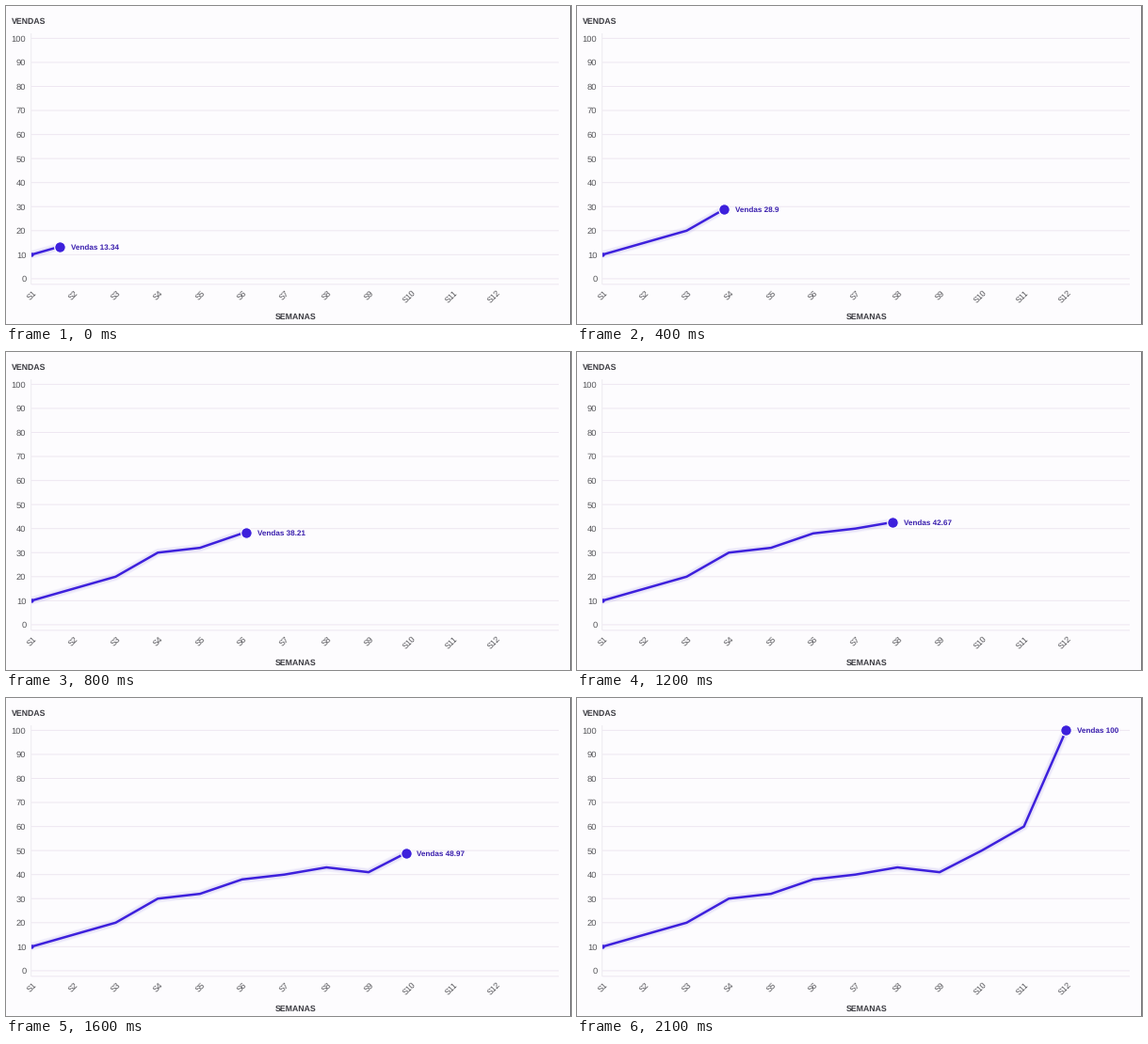
These frames come from a looping animation (600x338 px, 2.2 s). A matplotlib script:

```python
import numpy as np
import matplotlib.pyplot as plt
from matplotlib.animation import FuncAnimation
from matplotlib.patches import Rectangle

W, H, DPI = 600, 338, 100
FRAMES, INTERVAL = 22, 100
PX = 72 / DPI

BG, GRID, AXIS = "#fdfcfe", "#eee7f1", "#eeebf1"
TICK, TITLE = "#545458", "#3c3c42"
LINE, LABEL = "#3d20dc", "#3a1fae"

X0, X1, WEEK = 27, 587, 44.77
SALES = np.array([10, 15, 20, 30, 32, 38, 40, 43, 41, 50, 60, 100])
WEEKS = np.arange(len(SALES))

# Weeks reached at key steps; the pace is nearly constant, then the line rests.
KEY_STEPS = [0, 4, 6, 8, 12, 16, 18, 19, 20]
KEY_WEEKS = [0.668, 2.89, 3.778, 5.105, 6.89, 8.8856, 10.2233, 10.667, 11]


def sx(week):
    return X0 - 0.1 + WEEK * week


def sy(value):
    return 289.9 - 2.555 * value


plt.rcParams["font.family"] = "Liberation Sans"
plt.rcParams["text.hinting"] = "none"

fig = plt.figure(figsize=(W / DPI, H / DPI), dpi=DPI, facecolor=BG)
ax = fig.add_axes([0, 0, 1, 1])
ax.set_xlim(0, W)
ax.set_ylim(H, 0)
ax.axis("off")


def text(x, y, s, size, color, **kw):
    """Text centred vertically on its capital height."""
    return ax.text(x, y + 0.345 * size, s, fontsize=size * PX, color=color,
                   va="baseline", **kw)


def rule(xs, ys, color):
    ax.plot(xs, ys, color=color, lw=PX, solid_capstyle="butt", snap=False,
            zorder=1)


for v in range(0, 101, 10):
    rule([X0, X1], [sy(v)] * 2, GRID)
    text(21.4, sy(v) + 0.1, str(v), 9.4, TICK, ha="right")
rule([X0, X1], [295.8] * 2, GRID)
rule([X0 - 0.3] * 2, [29, 296], AXIS)

for w in WEEKS:
    ax.text(sx(w) + 3.3, 303.1, f"S{w + 1}", fontsize=8.7 * PX, color=TICK,
            rotation=45, rotation_mode="anchor", ha="right",
            va="center_baseline")

text(5.8, 15.4, "VENDAS", 8.75, TITLE, weight="bold")
text(307.2, 330.3, "SEMANAS", 8.8, TITLE, weight="bold", ha="center")
ax.add_patch(Rectangle((599, 0), 1, H, color="#77777b", lw=0))

clip = Rectangle((X0 - 0.5, 0), W - X0, H, transform=ax.transData)


def stroke(width, color, alpha=1, z=3):
    ln, = ax.plot([], [], color=color, lw=width * PX, alpha=alpha, zorder=z,
                  solid_capstyle="round", solid_joinstyle="round", snap=False)
    ln.set_clip_path(clip)
    return ln


def disc(size, edge, z):
    d, = ax.plot([], [], "o", ms=size * PX, mfc=LINE, mec="white",
                 mew=edge * PX, snap=False, zorder=z)
    return d


strokes = [stroke(w, LINE, 0.035, 2) for w in (9, 7.4, 5.8)]
strokes.append(stroke(2.5, LINE))
start = disc(4.4, 0, 4)
start.set_data([sx(0)], [sy(10)])
start.set_clip_path(clip)
dot = disc(11.6, 1.2, 5)
label = text(0, 0, "", 8.1, LABEL, weight="bold", zorder=6)


def draw(i):
    head = np.interp(i, KEY_STEPS, KEY_WEEKS)
    value = np.interp(head, WEEKS, SALES)
    past = WEEKS[WEEKS < head]
    xs = sx(np.append(past, head))
    ys = sy(np.append(SALES[past], value))
    for ln in strokes:
        ln.set_data(xs, ys)
    dot.set_data(xs[-1:], ys[-1:])
    label.set_position((xs[-1] + 11.7, ys[-1] + 0.1 + 0.345 * 8.1))
    number = f"{value:.2f}".rstrip("0").rstrip(".")
    label.set_text(f"Vendas {number}")
    return [*strokes, dot, label]


anim = FuncAnimation(fig, draw, frames=FRAMES, interval=INTERVAL,
                     repeat=True, repeat_delay=0, blit=False)
plt.show()
```
